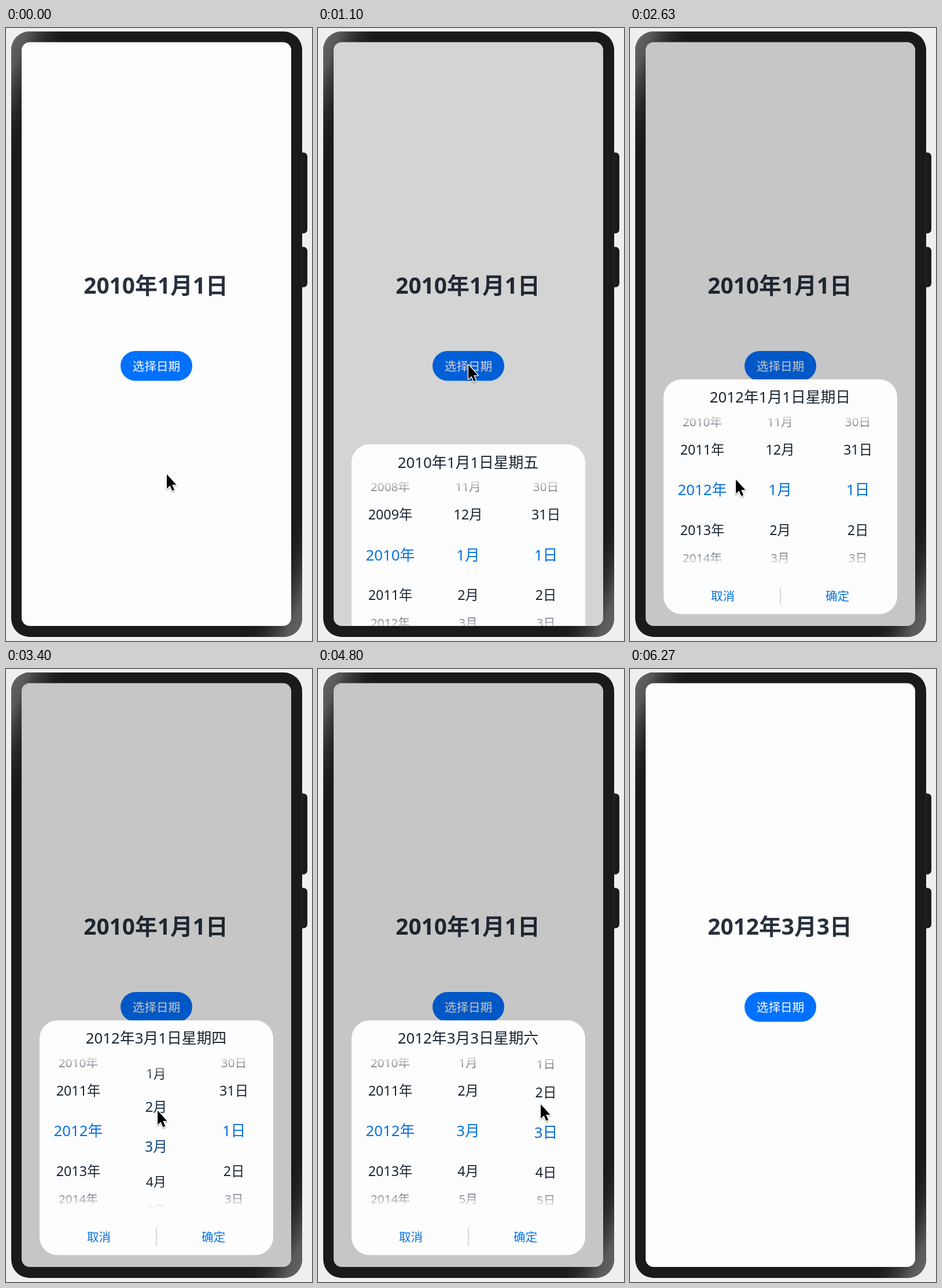
These frames come from a looping animation (529x1059 px, 6.96 s). An HTML page:

```html
<!DOCTYPE html>
<html lang="zh-CN">
<head>
<meta charset="utf-8">
<title>选择日期</title>
<style>
html, body { margin: 0; width: 100%; height: 100%; overflow: hidden; background: #efefef; }
svg { display: block; width: 529px; height: 1059px; }
text { font-family: "Noto Sans", "Noto Sans CJK SC", sans-serif; text-anchor: middle; white-space: pre; }
</style>
</head>
<body>
<svg viewBox="0 0 529 1059">
  <defs>
    <linearGradient id="shineA" gradientUnits="userSpaceOnUse" x1="9" y1="6" x2="94" y2="43">
      <stop offset="0" stop-color="#686868"/><stop offset=".3" stop-color="#585858"/>
      <stop offset="1" stop-color="#1a1a1a" stop-opacity="0"/>
    </linearGradient>
    <linearGradient id="shineB" gradientUnits="userSpaceOnUse" x1="512" y1="1052" x2="427" y2="1015">
      <stop offset="0" stop-color="#686868"/><stop offset=".3" stop-color="#585858"/>
      <stop offset="1" stop-color="#1a1a1a" stop-opacity="0"/>
    </linearGradient>
    <linearGradient id="fade" gradientUnits="userSpaceOnUse" x1="0" y1="664" x2="0" y2="931">
      <stop offset="0" stop-color="#000"/><stop offset=".15" stop-color="#fff"/>
      <stop offset=".85" stop-color="#fff"/><stop offset="1" stop-color="#000"/>
    </linearGradient>
    <mask id="wheelMask" maskUnits="userSpaceOnUse" x="58" y="664" width="404" height="267">
      <rect x="58" y="664" width="404" height="267" fill="url(#fade)"/>
    </mask>
    <clipPath id="screen"><rect x="27" y="24.5" width="466" height="1008.5" rx="14"/></clipPath>
    <filter id="soft" x="-50%" y="-50%" width="200%" height="200%">
      <feDropShadow dx="0" dy="1.5" stdDeviation="1.3" flood-opacity=".4"/>
    </filter>
  </defs>

  <path fill="#1a1a1a" d="M512 215h1q8 0 8 8v124q0 8-8 8h-1zM512 378h1q8 0 8 8v54q0 8-8 8h-1z"/>
  <g id="body"></g>
  <path d="M512.2 215v140M512.2 378v70" stroke="#444" stroke-width=".6"/>

  <g clip-path="url(#screen)">
    <rect x="27" y="24" width="466" height="1010" fill="#fdfdfd"/>
    <text id="title" font-weight="700" fill="#27303c"></text>
    <rect id="open" x="198" y="558" width="124" height="51.5" rx="25.7"/>
    <text id="openLabel" fill="#fff"></text>
    <rect id="scrim" x="27" y="24" width="466" height="1010"/>
    <g id="dialog">
      <rect x="58" y="607" width="404" height="405.5" rx="31" fill="#fdfdfd"/>
      <text id="heading" font-weight="500" fill="#182431"></text>
      <g id="wheels" mask="url(#wheelMask)"></g>
      <path d="M260 966v31" stroke="#c9c9c9" stroke-width="1.4"/>
      <rect id="press" x="262" y="958" width="194" height="47" rx="23.5" fill="#e0e0e0"/>
      <text id="cancel" font-weight="500" fill="#0572e0"></text>
      <text id="confirm" font-weight="500" fill="#0572e0"></text>
    </g>
  </g>
  <path id="cursor" d="M0 0V24.6L5.5 19.4L9.4 28.6L13.1 27L9.2 17.9H16.4Z" fill="#000"
    stroke="#fff" stroke-width="2.6" paint-order="stroke" stroke-linejoin="round" filter="url(#soft)"/>
</svg>

<script>
const LOOP = 6960, MID = 797.5;
const $ = id => document.getElementById(id);
const clamp = v => Math.max(0, Math.min(1, v));
const lerp = (a, b, k) => a + (b - a) * k;
const smooth = k => k * k * (3 - 2 * k);
const easeOut = k => 1 - (1 - k) ** 3;
const span = (t, a, b) => clamp((t - a) / (b - a));
const wrap = (n, max) => ((n - 1) % max + max) % max + 1;

function make(parent, tag, attrs = {}) {
  const el = document.createElementNS("http://www.w3.org/2000/svg", tag);
  for (const k in attrs) el.setAttribute(k, attrs[k]);
  return parent.appendChild(el);
}

// Centres a line of text on (x, y).
function put(el, text, x, y, size) {
  if (el.textContent !== text) el.textContent = text;
  el.setAttribute("x", x);
  el.setAttribute("y", y + size * 0.38);
  el.setAttribute("font-size", size);
}

for (const fill of ["#1a1a1a", "url(#shineA)", "url(#shineB)"])
  make($("body"), "rect", { x: 9, y: 6, width: 503, height: 1046, rx: 32, fill });

put($("openLabel"), "选择日期", 260, 583.7, 20.6);
put($("cancel"), "取消", 160.5, 981.5, 20.6);
put($("confirm"), "确定", 358.5, 981.5, 20.6);

// time, x, y of the pointer tip
const path = [
  [0, 278, 771], [60, 278, 771], [650, 260, 582], [1250, 260, 582],
  [1670, 209, 768], [1850, 150, 860], [1900, 150, 860], [2300, 150, 765],
  [2450, 150, 765], [2630, 183, 780], [2830, 265, 865], [2950, 265, 865],
  [3450, 262, 760], [3650, 262, 760], [4180, 387, 856], [4280, 387, 856],
  [4700, 385, 752], [4950, 385, 752], [5400, 365, 987], [5640, 365, 987],
  [5960, 298, 671], [LOOP, 298, 671]
];

function pointer(t) {
  const i = path.findIndex(p => p[0] > t);
  const [a, b] = [path[i - 1], path[i]];
  const k = smooth(span(t, a[0], b[0]));
  return [lerp(a[1], b[1], k), lerp(a[2], b[2], k)];
}

const daysIn = (y, m) => new Date(y, m, 0).getDate();
const wheels = [
  { x: 125, first: 2010, from: 1900, to: 2420, unit: "年" },
  { x: 259.5, first: 1, from: 2950, to: 3580, unit: "月" },
  { x: 394, first: 1, from: 4280, to: 4850, unit: "日" }
];
for (const w of wheels)
  w.rows = Array.from({ length: 7 }, () => make($("wheels"), "text"));

const offsets = [0, 69.2, 117.3, 165];
const sizes = [25.8, 23.3, 20.7, 18.5];
const sample = (list, d) => {
  const i = Math.min(2, Math.floor(d));
  return lerp(list[i], list[i + 1], d - i);
};
const ink = [24, 36, 49], blue = [5, 114, 224];

function drawWheel(w, pos, max) {
  const near = Math.round(pos);
  w.rows.forEach((el, i) => {
    const n = near + i - 3, p = n - pos, d = Math.min(3, Math.abs(p));
    const k = clamp(d * 1.4);
    put(el, (max ? wrap(n, max) : n) + w.unit, w.x, MID + Math.sign(p) * sample(offsets, d), sample(sizes, d));
    el.setAttribute("fill", `rgb(${blue.map((c, j) => Math.round(lerp(c, ink[j], k)))})`);
    el.setAttribute("font-weight", d < 0.5 ? 500 : 400);
  });
}

function draw(t) {
  const shown = easeOut(span(t, 1000, 1280)) * (1 - smooth(span(t, 5640, 5880)));
  $("scrim").setAttribute("opacity", 0.22 * shown);
  $("dialog").setAttribute("transform", `translate(0 ${430 * (1 - shown)})`);
  $("dialog").setAttribute("visibility", shown > 0 ? "visible" : "hidden");
  $("open").setAttribute("fill", t > 900 && t < 1000 ? "#0066e6" : "#0071ff");
  $("press").setAttribute("opacity", span(t, 5380, 5450));
  put($("title"), t < 5660 ? "2010年1月1日" : "2012年3月3日", 259, 444.5, 38.8);

  const pos = wheels.map(w => w.first + 2 * smooth(span(t, w.from, w.to)));
  const [y, m, d] = pos.map(Math.round);
  const week = "日一二三四五六"[new Date(y, m - 1, d).getDay()];
  put($("heading"), `${y}年${m}月${d}日星期${week}`, 259.5, 637.5, 25.8);
  const limits = [0, 12, daysIn(y, m)];
  wheels.forEach((w, i) => drawWheel(w, pos[i], limits[i]));

  const [cx, cy] = pointer(t);
  $("cursor").setAttribute("transform", `translate(${cx} ${cy})`);
  $("cursor").setAttribute("visibility", t < 6200 ? "visible" : "hidden");
}

const start = performance.now();
function tick() {
  draw((performance.now() - start) % LOOP);
  requestAnimationFrame(tick);
}
tick();
</script>
</body>
</html>
```
